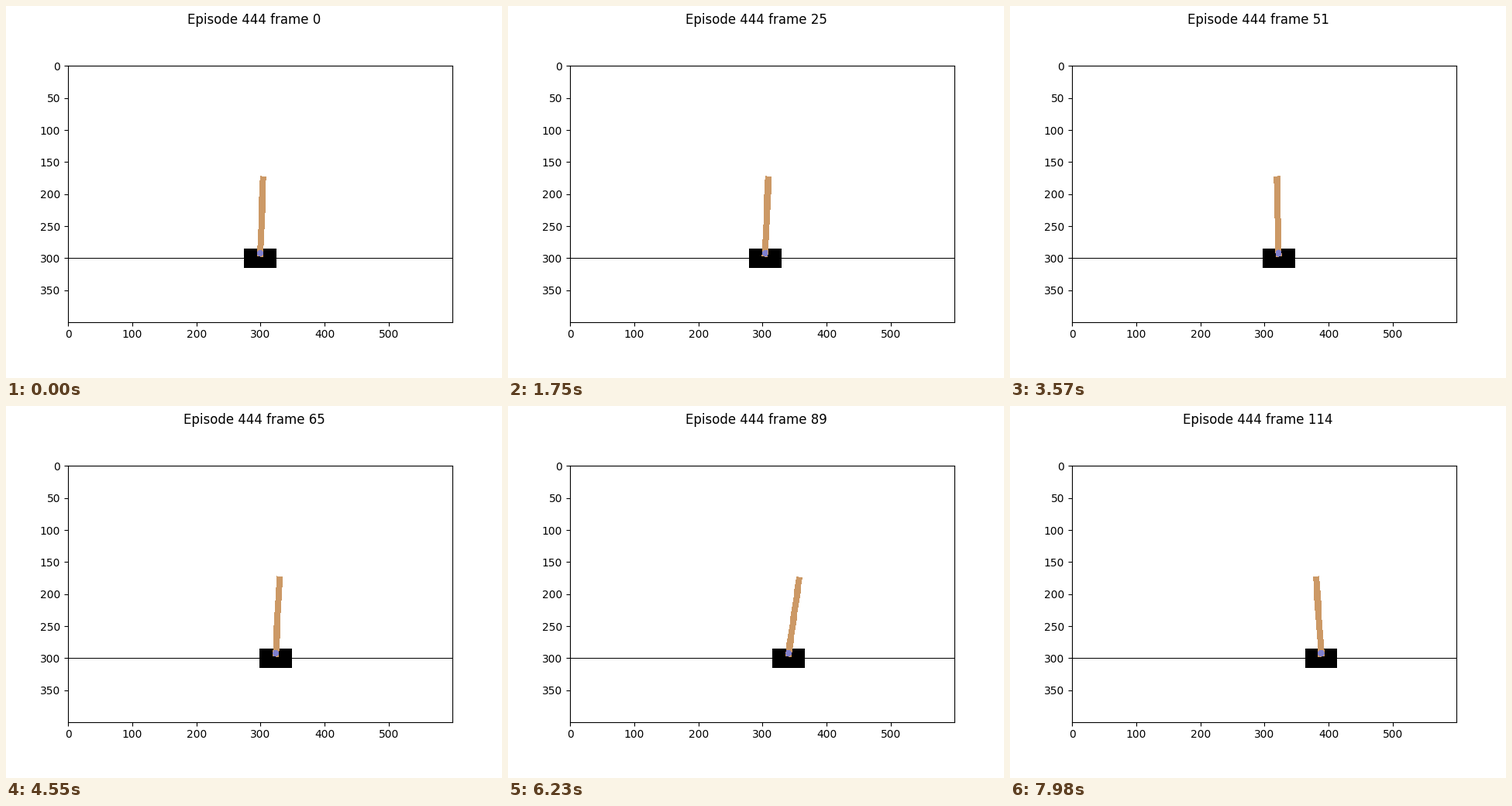
These frames come from a looping animation (640x480 px, 8000 ms). A matplotlib script:

```python
import matplotlib.pyplot as plt
import numpy as np
from matplotlib.animation import FuncAnimation

LOOP_MS, TICK_MS, STEP_MS = 8000, 20, 70
WIDTH, HEIGHT = 600, 400
TRACK_Y, AXLE_Y = 300, 292.5
CART_W, CART_H = 50, 30
POLE_W, POLE_LEN = 10, 120
STILL_POINT = 78          # distance up the pole that glides smoothly
BLACK, TAN, BLUE = (0, 0, 0), (204, 153, 102), (127, 127, 204)
HELD_STEPS = (31, 62, 111)  # these repeat the step before

# (step, x) where the cart turns or changes pace
CART_KEYS = [(0, 300), (25, 304.6), (33, 313.5), (43, 312), (51, 322.5),
             (60, 316.9), (65, 324.3), (77, 336), (86, 337.3),
             (99, 370.8), (110, 389.3), (114, 388.9)]


def smooth_path(points):
    """Monotone cubic through the points, at rest at turns and both ends."""
    t, x = np.array(points, float).T
    h, slope = np.diff(t), np.diff(x) / np.diff(t)
    before, after = slope[:-1], slope[1:]
    same_way = before * after > 0
    speed = np.zeros(len(t))
    speed[1:-1][same_way] = (2 * before * after / (before + after))[same_way]

    def at(time):
        i = np.clip(np.searchsorted(t, time) - 1, 0, len(h) - 1)
        u = (time - t[i]) / h[i]
        ease = u * u * (3 - 2 * u)
        bend = h[i] * u * (1 - u) * (speed[i] * (1 - u) - speed[i + 1] * u)
        return x[i] + (x[i + 1] - x[i]) * ease + bend

    return at


def glide_x(step):
    """Slowly gathering drift to the right with a gentle sway."""
    sway = 0.035 * np.cos(2 * np.pi * (step - 104) / 64)
    return 303.1 + step * (0.05 + 0.0056 * step + sway)


cart_x = smooth_path(CART_KEYS)
rows, cols = np.mgrid[0:HEIGHT, 0:WIDTH] + 0.5


def render(step):
    x = cart_x(step)
    angle = np.arcsin((glide_x(step) - x) / STILL_POINT)
    image = np.full((HEIGHT, WIDTH, 3), 255, np.uint8)
    image[TRACK_Y] = BLACK

    top, bottom = TRACK_Y - CART_H // 2, TRACK_Y + CART_H // 2
    left = int(round(x - CART_W / 2))
    image[top:bottom, left:left + CART_W] = BLACK

    # pole coordinates: along the pole and across it
    area = np.s_[160:310, 250:450]
    dx, dy = cols[area] - x, AXLE_Y - rows[area]
    along = dx * np.sin(angle) + dy * np.cos(angle)
    across = dx * np.cos(angle) - dy * np.sin(angle)
    half = POLE_W / 2
    pole = (abs(across) <= half) & (along >= -half) & (along <= POLE_LEN)
    image[area][pole] = TAN
    image[area][np.hypot(dx, dy) <= half] = BLUE
    return image


plt.rcParams["text.kerning_factor"] = 6
fig, ax = plt.subplots(figsize=(6.4, 4.8), dpi=100)
picture = ax.imshow(render(0), interpolation="nearest")
title = fig.suptitle("Episode 444 frame 0", y=0.98 + 1 / 480)


def update(tick):
    step = (tick * TICK_MS + TICK_MS // 2) // STEP_MS
    if step in HELD_STEPS:
        step -= 1
    picture.set_data(render(step))
    title.set_text(f"Episode 444 frame {step}")
    return picture, title


anim = FuncAnimation(fig, update, frames=LOOP_MS // TICK_MS,
                     interval=TICK_MS, repeat=True, repeat_delay=0)
plt.show()
```
